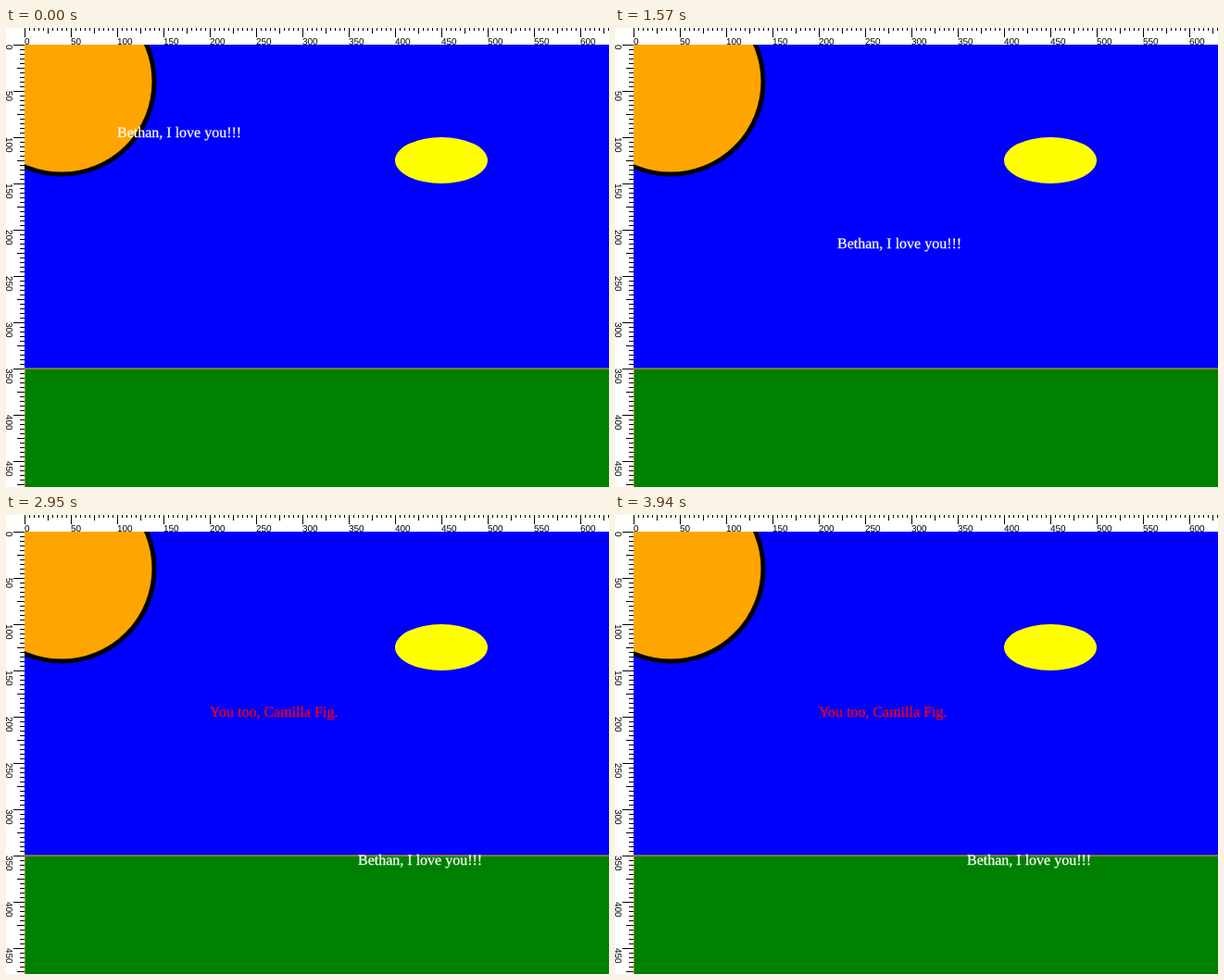
Recreate the animation shown at these times as an HTML page with a canvas. Size 651 px wide and 496 px high, loop 4.03 s.

```html
<!DOCTYPE html>
<html lang="en">
<head>
<meta charset="utf-8">
<title>Canvas greeting</title>
<style>
  html, body { margin: 0; width: 100%; height: 100%; overflow: hidden; background: #fff; }
  canvas { display: block; }
</style>
</head>
<body>
<canvas id="stage" width="651" height="496"></canvas>
<script>
const ctx = document.getElementById('stage').getContext('2d');
const W = 651, H = 496, LEFT = 20, TOP = 18, LOOP = 4030;
ctx.textRendering = 'geometricPrecision';

// Hard-cut poses: greeting position, reply visibility, pointer tip
const poses = [
  { at: 0, hello: [100, 100] },
  { at: 980, hello: [220, 220] },
  { at: 1970, hello: [360, 360] },
  { at: 2950, hello: [360, 360], reply: true },
  { at: 3760, hello: [360, 360], reply: true, pointer: [635, 483] },
  { at: 3850, hello: [360, 360], reply: true, pointer: [630, 487] },
  { at: 3940, hello: [360, 360], reply: true }
];

function ellipse(x, y, rx, ry, fill) {
  ctx.beginPath();
  ctx.ellipse(x, y, rx, ry, 0, 0, Math.PI * 2);
  ctx.fillStyle = fill;
  ctx.fill();
}

// The hairline stroke gives the text its slightly heavier weight
function label(text, x, y, color) {
  ctx.font = '16px "Liberation Serif", "Times New Roman", serif';
  ctx.fillStyle = ctx.strokeStyle = color;
  ctx.lineWidth = 0.25;
  ctx.fillText(text, x, y);
  ctx.strokeText(text, x, y);
}

// Ruler along +x: ticks hang from the far edge, numbers sit on the baseline
function ruler(length, edge) {
  ctx.font = '10px "Liberation Sans", Arial, sans-serif';
  ctx.fillStyle = '#000';
  for (let n = 0; n < length; n += 5) {
    const size = n % 50 === 0 ? 12 : n % 25 === 0 ? 8 : 5;
    ctx.fillRect(n, -edge, 1, size);
    if (n % 50 === 0) ctx.fillText(n, n, 0);
  }
}

function drawRulers() {
  ctx.save();
  ctx.translate(LEFT, TOP);
  ruler(W - LEFT, 20);
  ctx.restore();

  ctx.save();
  ctx.translate(0, TOP);
  ctx.transform(0, 1, -1, 0, 0, 0);
  ruler(H - TOP, 20);
  ctx.restore();
}

function drawPointer([x, y]) {
  const shape = [[0, 0], [0, 16], [4, 12.5], [6.5, 18], [9, 17], [6.5, 11.5], [11.5, 11.5]];
  ctx.beginPath();
  for (const [dx, dy] of shape) ctx.lineTo(x + dx + 0.5, y + dy + 0.5);
  ctx.closePath();
  ctx.fillStyle = '#000';
  ctx.fill();
  ctx.strokeStyle = '#fff';
  ctx.lineWidth = 1;
  ctx.stroke();
}

function drawScene(pose) {
  ctx.save();
  ctx.beginPath();
  ctx.rect(LEFT, TOP, W - LEFT, H - TOP);
  ctx.clip();
  ctx.translate(LEFT, TOP);

  ctx.fillStyle = '#00f';
  ctx.fillRect(0, 0, W, 350);
  ctx.fillStyle = '#008000';
  ctx.fillRect(0, 350, W, H);
  ctx.strokeStyle = '#ffa500';
  ctx.lineWidth = 1;
  ctx.strokeRect(0, 350, W, H);

  ellipse(40, 40, 100, 100, '#ffa500');
  ctx.strokeStyle = '#000';
  ctx.lineWidth = 5;
  ctx.stroke();
  ellipse(450, 125, 50, 25, '#ff0');

  label('Bethan, I love you!!!', ...pose.hello, '#fff');
  if (pose.reply) label('You too, Camilla Fig.', 200, 200, '#f00');
  ctx.restore();
}

function frame() {
  const t = performance.now() % LOOP;
  const pose = poses.filter(p => p.at <= t).pop();
  ctx.fillStyle = '#fff';
  ctx.fillRect(0, 0, W, H);
  drawRulers();
  drawScene(pose);
  if (pose.pointer) drawPointer(pose.pointer);
  requestAnimationFrame(frame);
}

frame();
</script>
</body>
</html>
```
